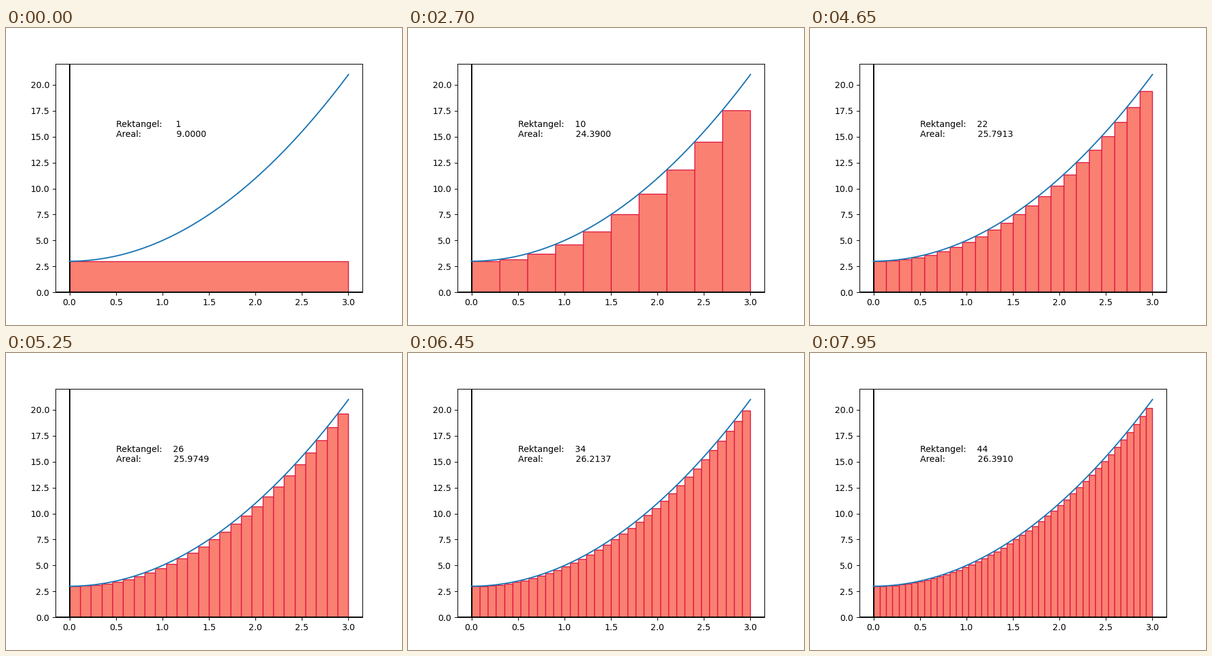
Write a matplotlib script that moves like this. It is 640 px wide and 480 px high and loops after 8 s.

```python
import numpy as np
import matplotlib.pyplot as plt
from matplotlib.animation import FuncAnimation

STEP = 50           # ms per frame
LOOP = 8000         # ms per loop
SLOW, FAST = 300, 150
SLOW_END = 3000     # when the count starts to rise faster
X_MAX = 3


def f(x):
    return 2 * x**2 + 3


def count_at(t):
    """Number of rectangles shown at time t (ms)."""
    if t < SLOW_END:
        return 1 + t // SLOW
    return 1 + SLOW_END // SLOW + (t - SLOW_END) // FAST


fig, ax = plt.subplots(figsize=(6.4, 4.8), dpi=100)
ax.axhline(0, color="black", lw=1.5)
ax.axvline(0, color="black", lw=1.5)
xs = np.linspace(0, X_MAX, 100)
ax.plot(xs, f(xs), color="tab:blue", lw=1.5)
label = ax.text(0.5, 15, "", fontsize=10, family="DejaVu Sans")


def update(i):
    n = count_at(i * STEP)
    width = X_MAX / n
    left = np.arange(n) * width
    heights = f(left)

    for patch in list(ax.patches):
        patch.remove()
    ax.bar(left, heights, width, align="edge",
           color="salmon", edgecolor="crimson", linewidth=1)
    ax.set_xlim(-0.15, 3.15)
    ax.set_ylim(0, 22.05)

    area = heights.sum() * width
    label.set_text(f"Rektangel:{n:6d}\nAreal:{area:19.4f}")
    return [label, *ax.patches]


anim = FuncAnimation(fig, update, frames=LOOP // STEP, interval=STEP,
                     repeat=True, repeat_delay=0, blit=False)
plt.show()
```
